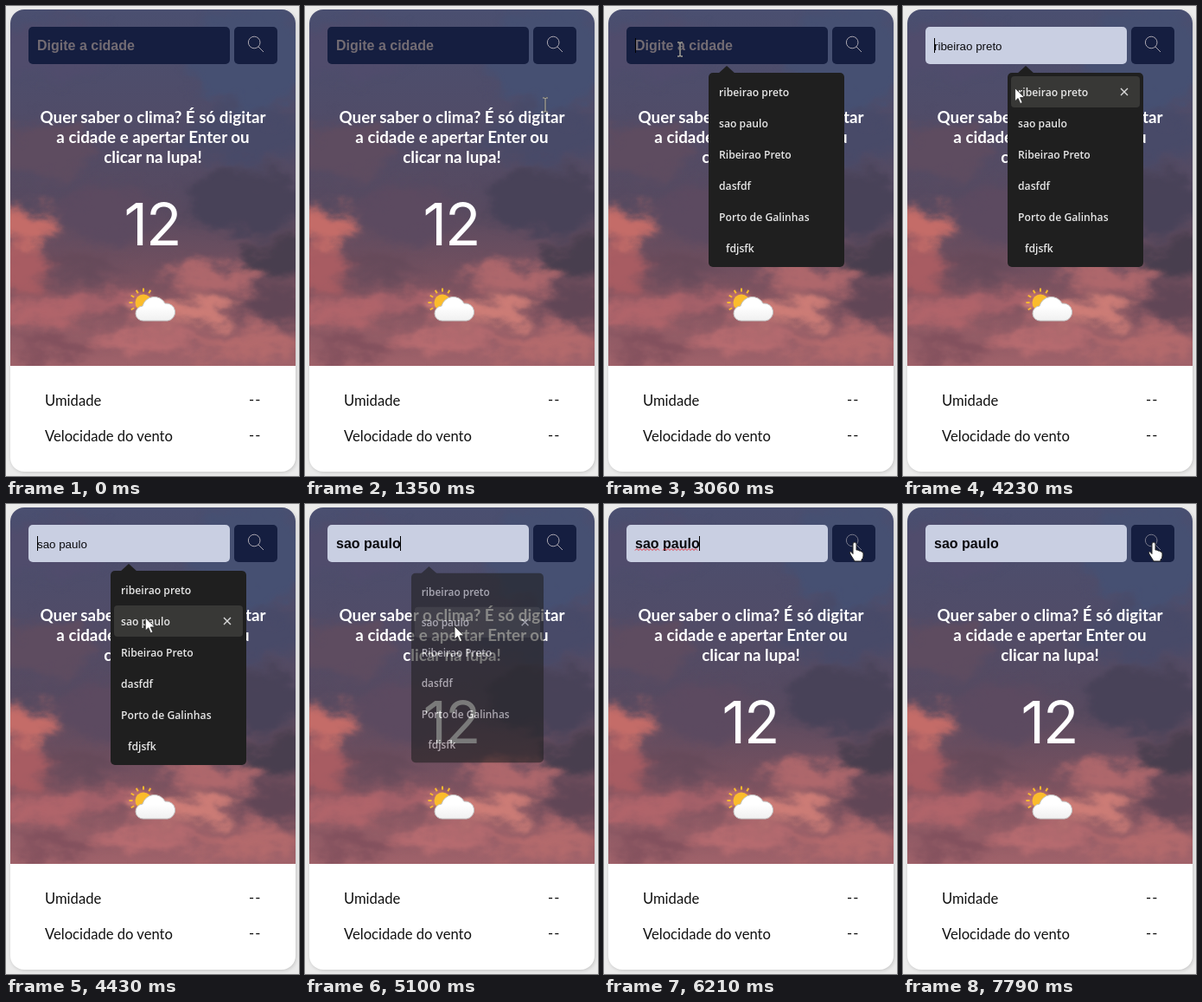
An HTML page for the animation above (8000 ms loop, 339x542 px).

```html
<!DOCTYPE html>
<html lang="pt-BR">
<head>
<meta charset="utf-8">
<title>Clima</title>
<style>
html, body { margin: 0; width: 100%; height: 100%; overflow: hidden; background: #ebebeb; }
svg { display: block; width: 339px; height: 542px; }
.lato { font-family: Lato, sans-serif; }
.head { font-size: 18.8px; font-weight: 700; fill: #fff; text-anchor: middle; }
.info { font-size: 16.6px; fill: #111; }
.temp { font: 400 68px Inter, sans-serif; letter-spacing: -2px; fill: #fff; text-anchor: middle; }
.field { font: 700 16px "Liberation Sans", Arial, sans-serif; }
.field.preview { font-weight: 400; font-size: 13.33px; }
.list { font: 600 12.2px "Open Sans", sans-serif; fill: #e6e6e6; }
</style>
</head>
<body>
<svg viewBox="0 0 339 542">
  <defs>
    <clipPath id="card"><rect x="5" y="4" width="330" height="533" rx="16"/></clipPath>
    <clipPath id="photo"><rect x="5" y="4" width="330" height="411"/></clipPath>
    <linearGradient id="dusk" x2="0" y2="1">
      <stop offset="0" stop-color="#4a4f70"/>
      <stop offset=".3" stop-color="#504c68"/>
      <stop offset=".55" stop-color="#574a60"/>
      <stop offset=".8" stop-color="#7c525f"/>
      <stop offset="1" stop-color="#a0626a"/>
    </linearGradient>
    <linearGradient id="fluff" x2="0" y2="1">
      <stop offset=".4" stop-color="#fff"/>
      <stop offset="1" stop-color="#f0f0f0"/>
    </linearGradient>
    <filter id="wisps" filterUnits="userSpaceOnUse" x="-40" y="-40" width="420" height="500" color-interpolation-filters="sRGB">
      <feGaussianBlur stdDeviation="7" result="soft"/>
      <feTurbulence type="fractalNoise" baseFrequency=".022 .035" numOctaves="4" seed="7"/>
      <feDisplacementMap in="soft" scale="48" xChannelSelector="R" yChannelSelector="G"/>
      <feGaussianBlur stdDeviation=".6"/>
    </filter>
    <filter id="shade"><feGaussianBlur stdDeviation="2"/></filter>
  </defs>

  <rect x="6" y="6" width="330" height="532" rx="16" fill="#000" opacity=".16" filter="url(#shade)"/>
  <g clip-path="url(#card)">
    <rect x="5" y="4" width="330" height="533" fill="#fff"/>
    <g clip-path="url(#photo)">
      <rect x="5" y="4" width="330" height="411" fill="url(#dusk)"/>
      <g id="clouds" filter="url(#wisps)"/>
    </g>
  </g>

  <rect id="box" x="26" y="24" width="233" height="43" rx="5"/>
  <rect x="264" y="24" width="50" height="43" rx="5" fill="#151e40"/>
  <path id="lens" d="M294 42a6.800 6.800 0 1 1-13.600 0a6.800 6.800 0 1 1 13.600 0M292 47l6 6" fill="none"/>
  <text id="entry" class="field" x="36" y="51"></text>
  <path id="squiggle" fill="none" stroke="#e0303c"/>
  <rect id="caret" y="37" width="1" height="17" fill="#000"/>

  <g class="lato head">
    <text x="170" y="135">Quer saber o clima? É só digitar</text>
    <text x="170" y="158">a cidade e apertar Enter ou</text>
    <text x="170" y="181">clicar na lupa!</text>
  </g>
  <text class="temp" x="169" y="276">12</text>

  <circle cx="159" cy="342" r="9.500" fill="#fbbc2c"/>
  <g id="rays" stroke="#fbbc2c" stroke-width="2"/>
  <path d="M159 363a8.500 8.500 0 0 1-1-17a14 14 0 0 1 26-3a10 10 0 0 1 3 20z" fill="url(#fluff)" stroke="#c4c4c4"/>

  <g class="lato info">
    <text x="45" y="461">Umidade</text>
    <text x="281" y="460" letter-spacing="1">--</text>
    <text x="45" y="502">Velocidade do vento</text>
    <text x="281" y="501" letter-spacing="1">--</text>
  </g>

  <g id="popup">
    <path d="M132 78l10-9l10 9z" fill="#1f1f1f"/>
    <rect x="121" y="77" width="157" height="224" rx="5" fill="#1f1f1f"/>
    <g id="hover">
      <rect x="125" y="81" width="149" height="36" rx="4" fill="#383836"/>
      <path d="M252 95l8 8m0-8l-8 8" stroke="#d8d8d8" stroke-width="1.400"/>
    </g>
    <g id="rows" class="list"/>
  </g>

  <g id="pointer">
    <path id="arrow" d="M0 0v15l3.500-3.300l2.600 6l2.500-1.100l-2.600-5.800h5z" fill="#fff" stroke="#222" stroke-width=".8"/>
    <g id="beam" fill="none">
      <path d="M-3-8h2.500l.5.500l.5-.500h2.500M0-7.500v15M-3 8h2.500l.5-.500l.5.500h2.500" stroke="#222" stroke-width="2.200"/>
      <path d="M-3-8h2.500l.5.500l.5-.500h2.500M0-7.500v15M-3 8h2.500l.5-.500l.5.500h2.500" stroke="#ddd"/>
    </g>
    <path id="hand" d="M-2 2a2 2 0 0 1 4 0v7q3-.5 3 1q2.500-.5 2.800 1q2.200 0 2.200 2v3q0 3-2 4v2h-8l-5-8q-1.500-3 .5-3q1 .5 2.500 2.500z" fill="#fff" stroke="#222"/>
  </g>
</svg>
<script>
const LOOP = 8000;
const cities = ['ribeirao preto', 'sao paulo', 'Ribeirao Preto', 'dasfdf', 'Porto de Galinhas', 'fdjsfk'];
const $ = id => document.getElementById(id);
const show = (id, on) => { $(id).style.display = on ? '' : 'none'; };

function add(parent, tag, attrs, text = '') {
  const el = document.createElementNS('http://www.w3.org/2000/svg', tag);
  for (const name in attrs) el.setAttribute(name, attrs[name]);
  el.textContent = text;
  parent.append(el);
}

// Sky: cx, cy, rx, ry, colour
[
  [285, 60, 70, 60, '#465072'], [50, 50, 70, 30, '#504c6c'],
  [40, 165, 65, 32, '#5e4c60'], [275, 150, 70, 30, '#484a68'],
  [280, 225, 75, 38, '#484258'], [120, 240, 60, 30, '#5c4a60'],
  [20, 255, 38, 26, '#c46c68'], [15, 305, 38, 24, '#a85c62'],
  [85, 300, 50, 16, '#664a5a'], [45, 352, 50, 18, '#b0646a'],
  [240, 312, 58, 14, '#b0686c'], [130, 338, 55, 11, '#a9626a'],
  [205, 350, 65, 18, '#cc7c76'], [60, 392, 60, 10, '#804f5c'],
  [160, 385, 65, 13, '#b86c70'], [315, 290, 45, 22, '#483e4e'],
  [312, 345, 36, 24, '#604656'], [280, 392, 60, 15, '#b46a6c'],
].forEach(([cx, cy, rx, ry, fill]) => add($('clouds'), 'ellipse', { cx, cy, rx, ry, fill }));

for (let a = 120; a <= 300; a += 30)
  add($('rays'), 'path', { d: 'M12.500 0h4', transform: `translate(159 342) rotate(${a})` });

cities.forEach((city, i) => add($('rows'), 'text', { x: i < 5 ? 133 : 141, y: 104 + 36 * i }, city));

const wave = (x, n) => `M${x} 53.500` + 'l2-2l2 2'.repeat(n);
$('squiggle').setAttribute('d', wave(36, 7) + wave(68, 10));

// Each pointer stroke advances in equal held steps along evenly timed points
const strokes = [
  { start: 1280, end: 2020, steps: 12, via: [[321, 100], [235, 128], [150, 136], [57, 139]] },
  { start: 2210, end: 2950, steps: 11, via: [[57, 139], [84, 167], [95, 107], [95, 70], [90, 46], [88, 50]] },
  { start: 4020, end: 4630, steps: 10, via: [[88, 50], [122, 86], [160, 130], [173, 141]] },
  { start: 5710, end: 6210, steps: 8, via: [[173, 141], [222, 110], [270, 62], [290, 44]] },
];

function pointerAt(t) {
  const { start, end, steps, via } = strokes.filter(s => s.start <= t).pop() || strokes[0];
  const step = Math.floor((t - start) / (end - start) * (steps - 1)) + 1;
  const u = Math.min(1, Math.max(0, step / steps)) * (via.length - 1);
  const i = Math.min(via.length - 2, Math.floor(u));
  return via[i].map((a, axis) => a + (via[i + 1][axis] - a) * (u - i));
}

// Areas with selectable text: left, right, top, bottom
const textAreas = [[26, 259, 24, 67], [40, 300, 109, 139], [58, 282, 139, 163], [114, 226, 163, 186]];

function draw(t) {
  const [x, y] = pointerAt(t);
  const open = t >= 3060 && t < 5230;
  const chosen = t >= 4960;
  const overList = open && x > 121 && y > 77;
  const overButton = x > 264 && y < 67;
  const overText = !overList && textAreas.some(([l, r, a, b]) => x >= l && x <= r && y >= a && y <= b);
  const row = overList ? Math.max(0, Math.floor((y - 81) / 36)) : -1;

  show('pointer', t >= 1280);
  $('pointer').setAttribute('transform', `translate(${x} ${y})`);
  const kind = overButton ? 'hand' : overText ? 'beam' : 'arrow';
  for (const id of ['hand', 'beam', 'arrow']) show(id, id === kind);

  // The list fades and shrinks in four held steps
  const fade = Math.min(4, Math.max(0, Math.floor((t - 4960) / 67.5))) / 4;
  show('popup', open);
  $('popup').setAttribute('opacity', 1 - fade ** 1.3);
  $('popup').setAttribute('transform', `translate(199.5 189) scale(${1 - .05 * fade}) translate(-199.5 -189)`);
  show('hover', row >= 0);
  $('hover').setAttribute('transform', `translate(0 ${36 * row})`);

  const preview = !chosen && row >= 0;
  const filled = chosen || preview;
  $('box').setAttribute('fill', filled ? '#c9cfe2' : '#151e40');
  $('entry').setAttribute('class', preview ? 'field preview' : 'field');
  $('entry').setAttribute('fill', filled ? '#0c0c10' : '#736c73');
  $('entry').textContent = chosen ? cities[1] : preview ? cities[row] : 'Digite a cidade';
  $('lens').setAttribute('stroke', overButton ? '#77788a' : '#aaa6b0');

  const blink = Math.floor((t - (chosen ? 5020 : 3010)) / 540);
  show('caret', t >= 3060 && t < 7720 && blink % 2 < 1);
  $('caret').setAttribute('x', chosen ? 110 : 36);
  show('squiggle', t >= 5960 && t < 7720);
}

function tick() {
  draw(performance.now() % LOOP);
  requestAnimationFrame(tick);
}
tick();
</script>
</body>
</html>
```
